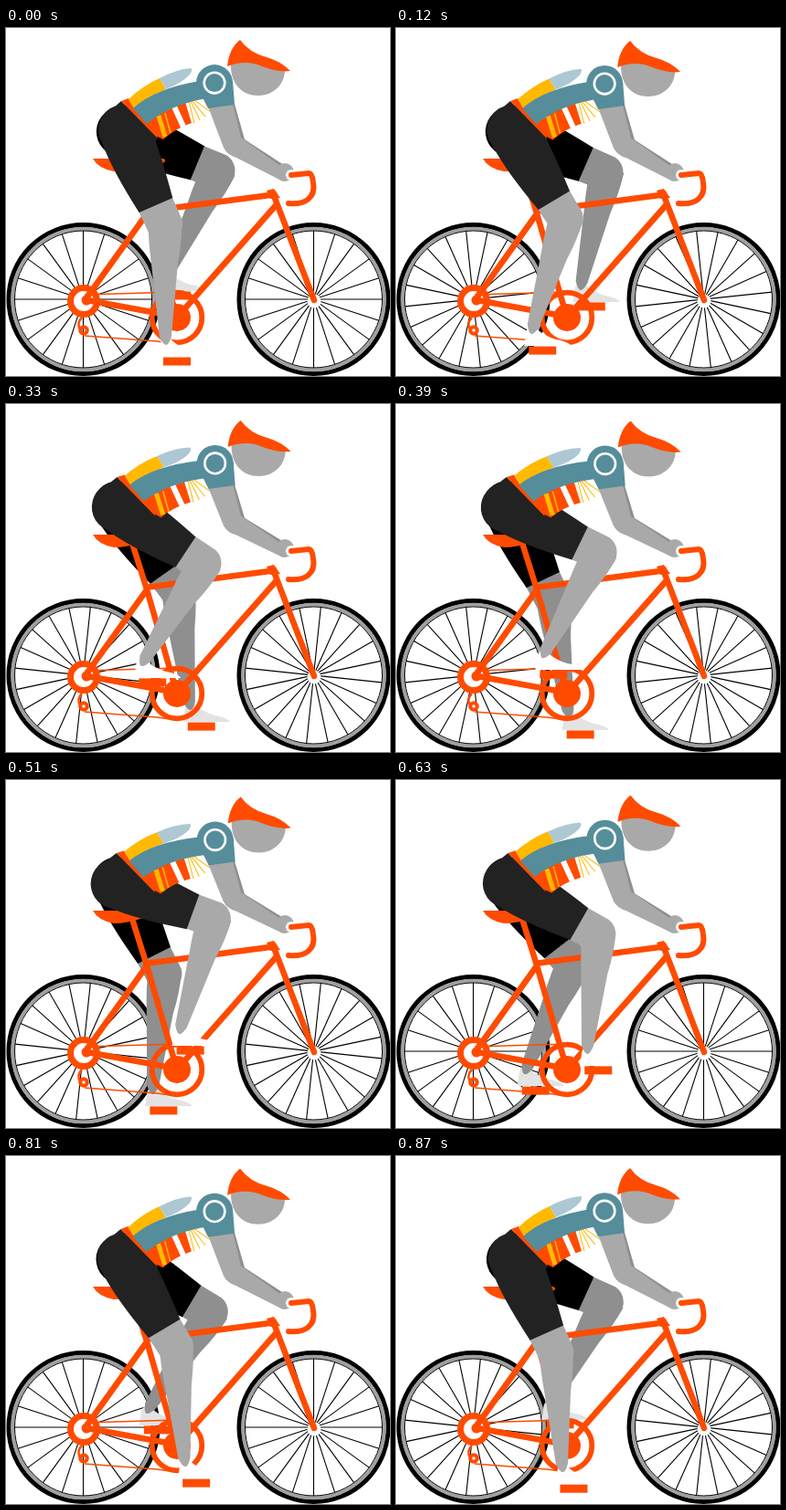
Recreate the animation shown at these times as an HTML page without scripts. Size 420x381 px, loop 900 ms.

```html
<!DOCTYPE html>
<html lang="en">
<head>
<meta charset="utf-8">
<title>Cyclist</title>
<style>
@property --a { syntax: '<angle>'; inherits: true; initial-value: 0deg; }

html, body { margin: 0; width: 100%; height: 100%; overflow: hidden; background: #fff; }

svg {
  display: block; width: 100%; height: 100%;
  --orange: #ff4b00; --skin: #a9a9a9; --shade: #8f8f8f; --teal: #568d9b; --yellow: #ffb900;
  /* --a is the crank angle, --p the sway of the upper body (0 to 1) */
  --p: calc(.56 - .54 * cos(var(--a)));
  animation: crank .9s steps(30) infinite;
}
@keyframes crank { to { --a: 360deg; } }

.line { fill: none; stroke: var(--orange); stroke-width: 6.5; }
.thin { stroke-width: 1.6; }
.orange { fill: var(--orange); }
.teal { fill: var(--teal); }
.yellow { fill: var(--yellow); }
.skin { fill: var(--skin); }
.shade { fill: var(--shade); }
.spokes { stroke: #000; stroke-width: 1.1; transform: rotate(var(--a)); }

/* Two-bone leg: thigh 110, shank 130, the ankle follows the pedal */
.leg {
  --b: var(--a);
  --fx: calc(187 - 36 * sin(var(--b)));
  --fy: calc(329 + 36 * cos(var(--b)));
  --hx: calc(130 - 6 * var(--p));
  --dx: calc(var(--fx) - 12 - var(--hx));
  --dy: calc(var(--fy) - 134);
  --knee: acos(min(1, (var(--dx) * var(--dx) + var(--dy) * var(--dy) - 29000) / 28600));
  --lead: atan2(130 * sin(var(--knee)), 110 + 130 * cos(var(--knee)));
  --shorts: #222; --flesh: var(--skin); --shoe: #fff;
}
.far { --b: calc(var(--a) + 180deg); --shorts: #000; --flesh: var(--shade); --shoe: #e3e3e3; }
.foot { transform: translate(calc(var(--fx) * 1px), calc(var(--fy) * 1px)); }
.thigh {
  transform: translate(calc(var(--hx) * 1px), 115px)
             rotate(calc(-1 * (atan2(var(--dx), var(--dy)) + var(--lead))));
}
.shank { transform: translate(0, 110px) rotate(calc(var(--knee))); }
.flesh { fill: var(--flesh); }
.shorts { fill: var(--shorts); }
.shoe { fill: var(--shoe); }

.torso {
  transform-origin: 125px 90px;
  transform: translate(calc(-5px * var(--p)), 0) skewY(calc(2.7deg * var(--p)))
             scaleX(calc(1 + .05 * var(--p)));
}
.upper { transform: translate(calc(.7px * var(--p)), calc(5.3px * var(--p))); }
.arm { transform-origin: 0 167px; transform: scaleY(calc(1 - .065 * var(--p))); }
</style>
</head>
<body>
<svg viewBox="0 0 420 381">
  <defs>
    <path id="spoke" d="M0-75V75"/>
    <g id="cross">
      <use href="#spoke"/>
      <use href="#spoke" transform="rotate(18)"/>
      <use href="#spoke" transform="rotate(36)"/>
      <use href="#spoke" transform="rotate(54)"/>
      <use href="#spoke" transform="rotate(72)"/>
    </g>
    <g id="rim" fill="none">
      <circle r="81.5" stroke="#000" stroke-width="5"/>
      <circle r="77.3" stroke="#a0a0a0" stroke-width="4"/>
      <circle r="75" stroke="#000"/>
    </g>
    <path id="shoeShape" d="M-20-5L-18-20Q-16-27-10-27L-2-20Q8-13 20-11Q30-8 31-5Z"/>
    <path id="pedal" d="M-15-4.5H15V4.5H-15Z"/>
    <path id="thighShape" d="M-27 0A27 27 0 0 1 27-8Q31 10 20 86H-20Q-29 30-27 0Z"/>
    <path id="kneeShape" d="M-20 85H20V112A20 20 0 0 1-19 114Z"/>
    <path id="shankShape" d="M-18-10Q-18 18-15 42L-7 122Q-3 131 0 131Q3 131 6 122L14 42Q19 18 19-4Z"/>
  </defs>

  <g transform="translate(84.5 297)">
    <use href="#rim"/>
    <g class="spokes"><use href="#cross"/><use href="#cross" transform="rotate(90)"/></g>
  </g>
  <g transform="translate(336.5 297)">
    <use href="#rim"/>
    <g class="spokes"><use href="#cross"/><use href="#cross" transform="rotate(90)"/></g>
  </g>

  <g class="leg far">
    <g class="foot">
      <use href="#shoeShape" class="shoe"/>
      <use href="#pedal" class="orange"/>
    </g>
    <g class="thigh">
      <g class="shank"><use href="#shankShape" class="flesh"/></g>
      <use href="#kneeShape" class="flesh"/>
      <use href="#thighShape" class="shorts"/>
    </g>
  </g>

  <!-- bicycle -->
  <circle cx="85" cy="299" r="14.5" class="line" style="fill:#fff;stroke-width:7"/>
  <circle cx="337" cy="299" r="7.5" fill="#fff"/>
  <path class="line" d="M138 152L154 203L187 317M152 201L296 182M297 192L187 317M155 202L87 297M89 298L187 316"/>
  <path class="line" stroke-linecap="round" d="M292 181L337 298"/>
  <path class="orange" d="M285 178L293 176L300 186L289 187Z"/>
  <circle class="orange" cx="88" cy="298" r="5.5"/>
  <path class="line thin" d="M86 292L187 289M86 337L165 343L187 346"/>
  <path class="line" style="stroke-width:2.5" d="M83 317Q77 323 81 330"/>
  <circle class="line" cx="85" cy="331" r="3.8" style="stroke-width:4"/>
  <circle class="line" cx="187" cy="317" r="27.3" style="stroke-width:5.8"/>
  <circle class="orange" cx="187" cy="317" r="15"/>
  <path class="orange" d="M95 143H166Q175 142 174 146Q171 150 150 151Q132 157 118 157Q101 154 95 143Z"/>

  <!-- arm and hand -->
  <g class="arm">
    <path class="shade" d="M240 84L250 83L261 122L304 150L300 156L252 132Z"/>
    <path class="skin" d="M221 86L248 83L257 120L300 151L303 168L252 142Q242 139 238 131Z"/>
  </g>
  <circle class="skin" cx="305" cy="158" r="10"/>
  <circle cx="312" cy="161" r="6" fill="#fff"/>
  <path class="line" stroke-linecap="round" style="stroke-width:6" d="M312 161L331 159Q335 159 336 169C339 185 328 194 309 192"/>

  <g class="leg">
    <g class="foot">
      <use href="#shoeShape" class="shoe"/>
      <use href="#pedal" class="orange"/>
    </g>
    <g class="thigh">
      <g class="shank"><use href="#shankShape" class="flesh"/></g>
      <use href="#kneeShape" class="flesh"/>
      <use href="#thighShape" class="shorts"/>
    </g>
  </g>

  <g class="torso">
    <path fill="#222" d="M103 118C104 101 112 92 126 80L166 121L150 140Z"/>
    <path class="orange" d="M126 80L134 77L160 101L166 121Z"/>
    <path class="orange" d="M150 104Q178 86 196 81L203 104Q185 110 172 122L164 118Z"/>
    <g fill="none" stroke="#ffb900">
      <path stroke-width="5" d="M167 96L174 119"/>
      <path stroke-width="1.5" d="M174 93L180 115"/>
      <path stroke="#fff" stroke-width="6" d="M184 86L194 108"/>
      <path d="M200 80L206 104M202 80L212 101M204 80L218 97M206 79L223 91"/>
    </g>
    <path class="yellow" d="M134 78Q150 63 168 55L175 67Q155 75 140 88Z"/>
    <path fill="#adc8d3" d="M168 55Q187 45 202 44Q205 45 201 51Q193 60 175 67Z"/>
    <path class="teal" d="M139 88Q163 66 212 58L226 76Q182 82 154 105Z"/>
  </g>

  <g class="upper">
    <path class="teal" d="M208 60L248 58L250 84L221 88L214 74Z"/>
    <circle class="teal" cx="228" cy="60" r="20"/>
    <circle cx="228" cy="60" r="11.3" fill="none" stroke="#fff" stroke-width="2.6"/>
    <path class="skin" d="M246 40Q262 34 280 40L305 46C305 62 292 74 276 74C258 74 246 61 246 42Z"/>
    <path class="orange" d="M256 13Q244 22 242 42Q262 34 280 42Q298 49 311 47Q300 36 285 32Q266 27 256 13Z"/>
  </g>
</svg>
</body>
</html>
```
